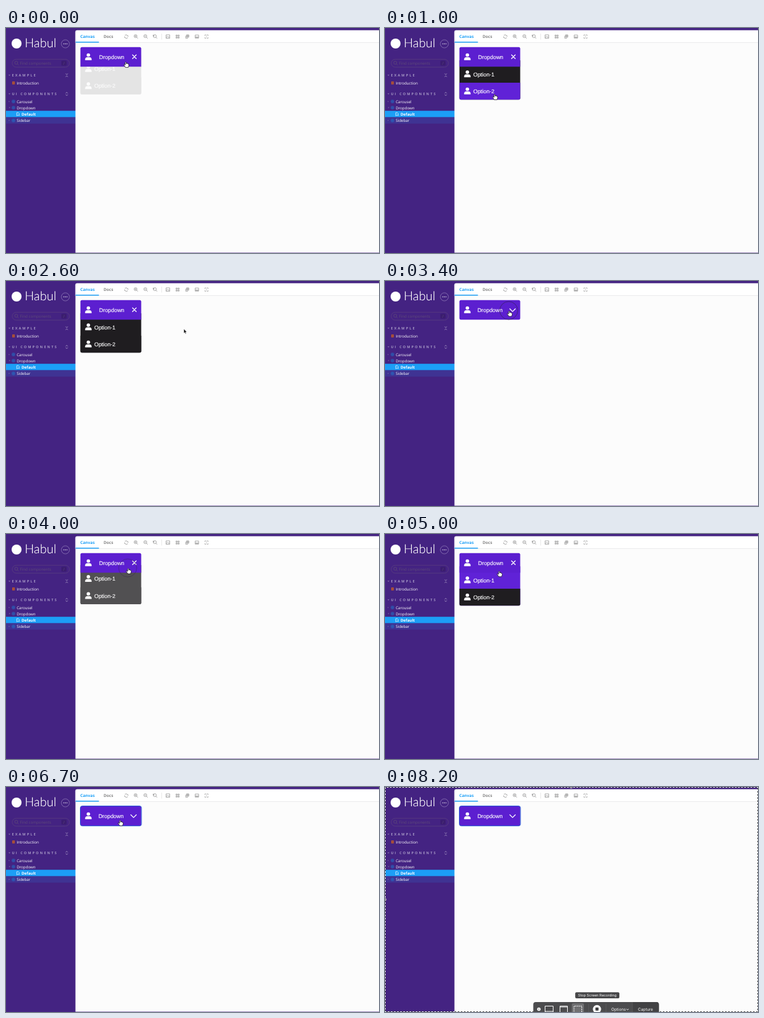
Write an HTML page that moves like this. It is 600 px wide and 362 px high and loops after 8300 ms.

```html
<!DOCTYPE html>
<html lang="en">
<head>
<meta charset="utf-8">
<title>Dropdown component</title>
<style>
  html, body { margin: 0; width: 100%; height: 100%; overflow: hidden; background: #442382; }
  svg { display: block; width: 100vw; height: 100vh; }
  text { font-family: "Open Sans", sans-serif; font-size: 6.2px; fill: #fff; text-rendering: geometricPrecision; }
  .brand { font: 300 20px Lato, sans-serif; stroke: #fff; stroke-width: .15; }
  .section { font-weight: 700; font-size: 5.6px; letter-spacing: 2.05px; fill: #a294c3; }
  .search { fill: #5f4b78; }
  .tab { font-weight: 700; font-size: 6.5px; }
  .card text { font: 8.900px "Liberation Sans", Arial, sans-serif; stroke: #fff; stroke-width: .15; }
  .line { fill: none; stroke: #fff; stroke-linecap: round; stroke-linejoin: round; }
  .tools { fill: none; stroke: #858585; stroke-width: .7; }
  .bar text { font-family: Inter, sans-serif; font-size: 6.4px; }
</style>
</head>
<body>
<svg viewBox="0 0 600 362" preserveAspectRatio="none">
  <defs>
    <g id="person" fill="#fff">
      <circle cy="-3" r="2.800"/>
      <path d="M-5.200 5.300V3.800C-5.200 1.600-3.400.6-1.800.6H1.800C3.400.6 5.200 1.600 5.200 3.800V5.300Z"/>
    </g>
    <g id="component" fill="none" stroke="#2273cb" stroke-width=".7">
      <rect x="-2.100" y="-2.100" width="4.200" height="4.200" rx=".6"/>
      <path d="M0-2V2M-2 0H2"/>
    </g>
    <g id="lens"><circle cx="-.6" cy="-.6" r="2.400"/><path d="M1.200 1.200 3.200 3.200"/></g>
    <clipPath id="menuShape"><path d="M119.700 52H217.500V112.700Q217.500 115.200 215 115.200H122.200Q119.700 115.200 119.700 112.700Z"/></clipPath>
  </defs>

  <!-- Sidebar -->
  <rect width="600" height="362" fill="#442382"/>
  <circle cx="17" cy="25" r="8" fill="#fff"/>
  <text class="brand" x="30" y="31.300">Habul</text>
  <circle cx="95.500" cy="25.500" r="6.500" fill="none" stroke="#9580bd" stroke-width=".7"/>
  <path class="line" d="M93 25.500h0M95.500 25.500h0M98 25.500h0" stroke-width="1.300"/>

  <rect x="10" y="50.300" width="92" height="12.700" rx="6.350" fill="none" stroke="#5d437f" stroke-width=".7"/>
  <use href="#lens" x="17" y="56.500" fill="none" stroke="#5f4b78" stroke-width=".8"/>
  <text class="search" x="22.500" y="58.800">Find components</text>
  <rect x="89" y="52.500" width="8.500" height="8" rx="1.500" fill="#3b1d70"/>
  <text class="search" x="92" y="58.700">/</text>

  <path d="M4 75.200h3l-1.500 1.800zM4 105.200h3l-1.500 1.800z" fill="#8674ae"/>
  <text class="section" x="9.500" y="78.400">EXAMPLE</text>
  <text class="section" x="9.500" y="108.400">UI COMPONENTS</text>
  <path class="line" d="M96.200 73.500 97.700 75.200 99.200 73.500M96.200 78.500 97.700 76.800 99.200 78.500M96.200 105 97.700 103.300 99.200 105M96.200 107.200 97.700 108.900 99.200 107.200" stroke-width=".7" opacity=".6"/>

  <rect x="10" y="86" width="4.200" height="4.800" rx=".5" fill="#b4552f"/>
  <path d="M11 87.500h2.200M11 89h2.200" stroke="#733160" stroke-width=".5"/>
  <rect y="133.200" width="112" height="10.400" fill="#1c9ef6"/>
  <rect y="143.600" width="112" height="10.200" fill="#3f3393"/>
  <use href="#component" x="12" y="118.200"/>
  <use href="#component" x="12" y="128.200"/>
  <use href="#component" x="12" y="148.800"/>
  <path d="M4.500 117.300l1.500 1-1.500 1zM4.500 127.500h2.500l-1.200 1.500zM4.500 147.800l1.500 1-1.500 1z" fill="#7866a4"/>
  <path class="line" d="M17.700 136.200h2.200l1.300 1.300v3.500l-1.700-1-1.800 1z" stroke-width=".7"/>
  <text x="17.200" y="90.600">Introduction</text>
  <text x="17.200" y="120.600">Carousel</text>
  <text x="17.200" y="130.500">Dropdown</text>
  <text x="25" y="140.800" font-weight="700">Default</text>
  <text x="17.200" y="151">Sidebar</text>

  <!-- Main panel -->
  <path d="M111.700 361.500V6Q111.700 3.700 114 3.700H600V361.500Z" fill="#fcfcfc"/>
  <path d="M111.700 23.500V6Q111.700 3.700 114 3.700H600V23.500Z" fill="#fff"/>
  <path d="M112 23.500H600" stroke="#e4e4e6" stroke-width=".7"/>
  <path d="M112 22.800H149.500" stroke="#1ea0f7" stroke-width="1.500"/>
  <text class="tab" x="119.500" y="16.200" style="fill:#1ea0f7">Canvas</text>
  <text class="tab" x="157" y="16.200" style="fill:#858585">Docs</text>
  <g class="tools">
    <path d="M191 12.300A2.700 2.700 0 0 1 196 13.500L197 12.700M196 15.300A2.700 2.700 0 0 1 191 14L190 15"/>
    <use href="#lens" x="209" y="13.700"/><path d="M207.200 13.100h2.400M208.400 11.900v2.400"/>
    <use href="#lens" x="224.700" y="13.700"/><path d="M222.900 13.100h2.400"/>
    <use href="#lens" x="240" y="13.700"/><path d="M236.800 10.800v2h2"/>
    <path d="M250.500 9V18.500" stroke="#dedede"/>
    <path d="M257.500 11h5.800v5.600h-5.800zM257.800 15.500l1.800-2 1.400 1.400 1-.8 1.200 1.200"/>
    <path d="M273.500 11.300h1.800v1.800h-1.800zM276.700 11.300h1.800v1.800h-1.800zM273.500 14.500h1.800v1.800h-1.800zM276.700 14.500h1.800v1.800h-1.800z"/>
    <path d="M290.300 11h3.800v3.800h-3.800zM289 12.600v3.800h3.800M290.300 12.900h3.800M292.200 11v3.800"/>
    <path d="M304.300 11.300h5.600v5h-5.600zM304.300 14.500h5.600M306.200 14.500v1.500M308 14.500v1.500"/>
    <path d="M320 12.500v-1.500h1.500M323.500 11h1.500v1.500M325 15v1.500h-1.500M321.500 16.500h-1.500v-1.500M322 13.700h1M322.500 11.200v.8M322.500 15.400v.8"/>
  </g>

  <!-- Dropdown -->
  <g class="card">
    <g id="menu">
      <g clip-path="url(#menuShape)">
        <rect id="row1" x="119" y="52" width="99" height="64"/>
        <rect id="row2" x="119" y="88" width="99" height="28"/>
      </g>
      <use href="#person" x="132.500" y="74"/>
      <use href="#person" x="132.500" y="101.500"/>
      <text x="142" y="77.600">Option-1</text>
      <text x="142" y="104.800">Option-2</text>
    </g>
    <path id="head" fill="#5c1fd0"/>
    <rect id="focus" x="119.600" y="30.600" width="98.300" height="32" rx="3" fill="none" stroke="#1c50d4"/>
    <use href="#person" x="132.500" y="46.500"/>
    <text id="label" y="49.900">Dropdown</text>
    <path id="sign" class="line" stroke-width="1.300"/>
  </g>

  <!-- Screen capture controls -->
  <g id="capture" class="bar">
    <rect x=".5" y=".5" width="599" height="361" fill="none" stroke="#f4f4f4"/>
    <rect x=".5" y=".5" width="599" height="361" fill="none" stroke="#3c3c3c" stroke-dasharray="2.500 2.500"/>
    <g fill="#777" stroke="#fff" stroke-width=".6">
      <circle cx="299.500" cy="0" r="1.900"/><circle cx="0" cy="181" r="1.900"/><circle cx="600" cy="181" r="1.900"/>
    </g>
    <rect x="238.500" y="346" width="202" height="30" rx="4" fill="#4c4c4e"/>
    <path d="M398 346h38.500q4 0 4 4v12H398z" fill="#424244"/>
    <path d="M327.500 349v13M355.500 349v13M398 346v16" stroke="#626264" stroke-width=".6"/>
    <circle cx="247.500" cy="357.500" r="2.800" fill="#fff"/>
    <path d="M246.500 356.500l2 2m0-2l-2 2" stroke="#444" stroke-width=".7"/>
    <rect x="300.500" y="348" width="19.500" height="20" rx="2" fill="#707072"/>
    <g class="line">
      <path d="M257.500 364v-11.500h13v11.500M257.500 361h13M281.500 364v-11.500h12v11.500M281.500 354h12"/>
      <path d="M304 364v-11.500h12.500v11.500" stroke-dasharray="1.200 2"/>
      <path d="M388.500 357.300l1.600 1.300 1.600-1.300" stroke-width=".8"/>
    </g>
    <circle cx="341" cy="357.300" r="6.600" fill="#fff"/>
    <rect x="338.500" y="354.800" width="5" height="5" rx=".7" fill="#3b3b3d"/>
    <text x="364" y="360">Options</text>
    <text x="407" y="360">Capture</text>
    <g id="tip">
      <rect x="306" y="330.300" width="71" height="9.700" rx="2" fill="#474749"/>
      <text x="341.500" y="337.300" text-anchor="middle" style="font-size:5.700px">Stop Screen Recording</text>
    </g>
  </g>

  <circle id="ring" r="14.500" fill="none" stroke="#33244f" stroke-width=".9"/>
  <g id="cursor">
    <path id="hand" transform="translate(.7 .6)" d="M-.9.800Q0-.600.900.800V3.200Q2-.1+2.400 2.600 3.500 2.200 3.700 3.500 5 3 5 4.500C5 6.500 4.300 7 4 8.800H-.6C-1 7.300-2.700 6-3.200 4.700-3.200 3.800-2 3.800-.9 5Z" fill="#fff" stroke="#17131f" stroke-width=".8"/>
    <path id="arrow" d="M0 0V7.200L1.600 5.800 2.700 8.300 3.900 7.800 2.800 5.300H5Z" fill="#111" stroke="#fff" stroke-width=".6"/>
  </g>
</svg>
<script>
const LOOP = 8300, STEP = 100, FADE = 300;
const $ = id => document.getElementById(id);
const set = (id, attrs) => {
  for (const name in attrs) $(id).setAttribute(name, attrs[name]);
};
const show = (id, on) => set(id, { visibility: on ? 'visible' : 'hidden' });
const clamp = v => Math.max(0, Math.min(1, v));

// Pointer path: time, x, y
const path = [
  [0, 192, 54], [200, 190, 58], [500, 182, 78], [1000, 175.5, 106],
  [1300, 176, 80], [1600, 177, 103], [1800, 196, 92], [2000, 245, 84],
  [2200, 280.5, 79], [2300, 280.5, 79], [2600, 286, 77], [2900, 250, 62],
  [3200, 200, 48], [3400, 199, 47.5], [3900, 199, 47.5], [4300, 186, 76],
  [4600, 181, 100], [5000, 182.8, 59.3], [5200, 182.8, 53], [6900, 182.8, 53],
  [7300, 265, 225], [7700, 341, 364], [LOOP, 341, 364]
];
const clicks = [3300, 3800, 5400];
const opened = [[-30, 3300], [3770, 5500]];

function pointer(t) {
  const i = path.findIndex(p => p[0] > t);
  const [t0, x0, y0] = path[i - 1], [t1, x1, y1] = path[i];
  const k = (t - t0) / (t1 - t0);
  return [x0 + (x1 - x0) * k, y0 + (y1 - y0) * k];
}

function draw(t) {
  const [x, y] = pointer(t);
  const span = opened.find(([from, to]) => t >= from && t < to);
  const reveal = span ? clamp((t - span[0]) / FADE) : 0;
  const over = x > 120 && x < 217 && y > 31 && y < (span ? 115 : 62);
  const rowFill = (top, bottom) => over && y >= top && y < bottom ? '#6022d7' : '#1f1d20';

  show('menu', span);
  set('menu', { opacity: reveal, transform: `translate(0 ${-9.5 * (1 - reveal)})` });
  set('row1', { fill: rowFill(59, 88) });
  set('row2', { fill: rowFill(88, 115) });

  const foot = span ? 'V62.2H119.7V33.3' : 'V59.8Q217.5 62.3 215 62.3H122.2Q119.7 62.3 119.7 59.8V33.3';
  set('head', { d: `M119.7 33.3Q119.7 30.8 122.2 30.8H215Q217.5 30.8 217.5 33.3${foot}Z` });
  set('label', { x: span ? 149.8 : 148.7 });
  set('sign', { d: span ? 'M203.5 43.3l6 6m0-6l-6 6' : 'M200.8 44.7l4.4 4.4 4.4-4.4' });
  show('focus', t >= 6700);

  const click = clicks.find(c => t >= c && t < c + 400);
  show('ring', click !== undefined);
  set('ring', { cx: x, cy: y, opacity: clamp(1 - (t - click) / 400) || 0 });

  show('hand', over);
  show('arrow', !over);
  set('cursor', { transform: `translate(${x} ${y})` });

  set('capture', { opacity: clamp((t - 6800) / 200) });
  set('tip', { opacity: clamp((t - 7700) / 300) });
}

let start;
function tick(now) {
  start ??= now;
  // A small lead keeps each step stable at its boundary.
  const t = (now - start + 30) % LOOP;
  draw(Math.floor(t / STEP) * STEP);
  requestAnimationFrame(tick);
}
draw(0);
requestAnimationFrame(tick);
</script>
</body>
</html>
```
